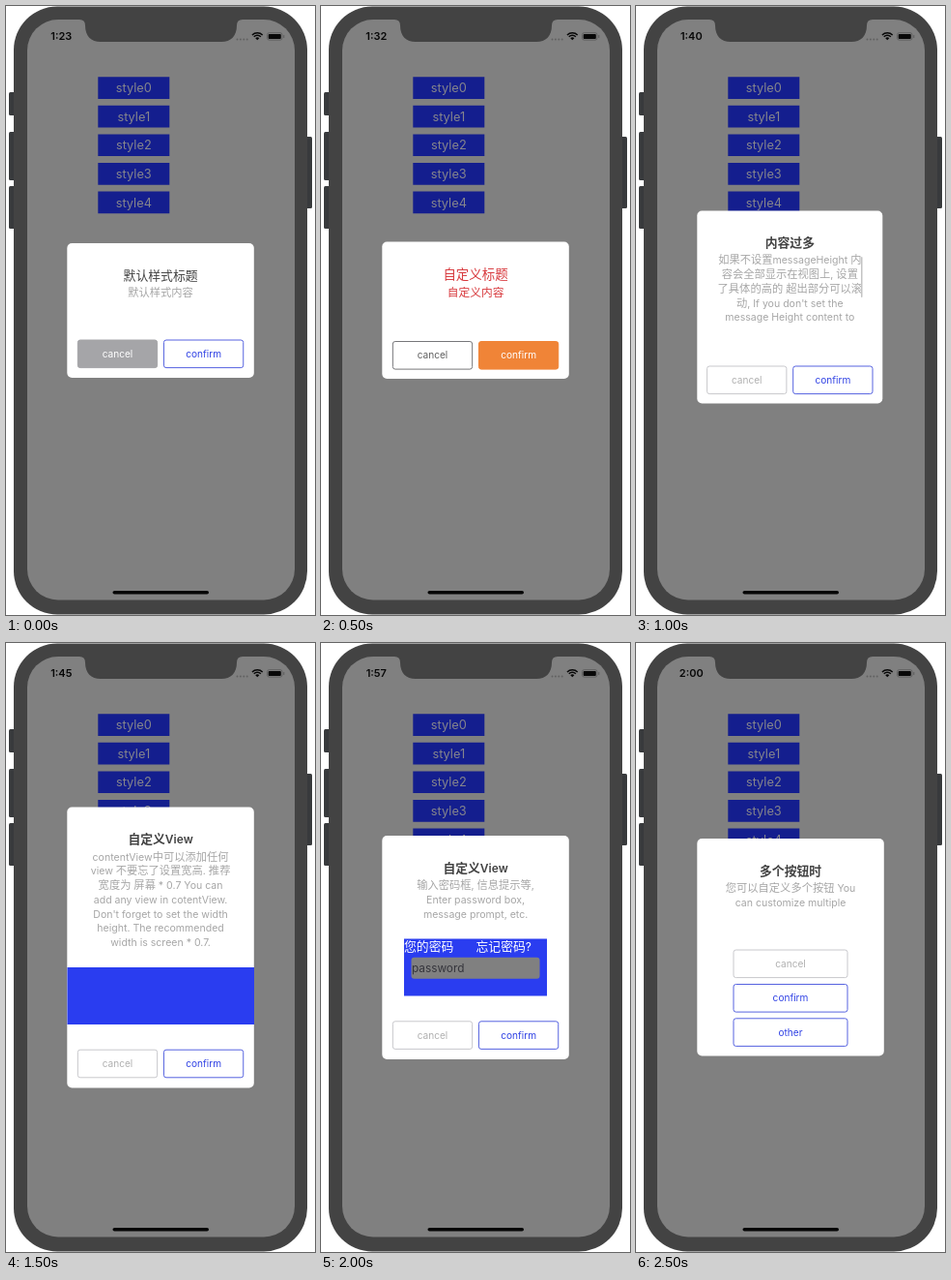
An HTML page with a canvas for the animation above (3 s loop, 320x629 px).

```html
<!DOCTYPE html>
<html lang="zh-CN">
<head>
<meta charset="utf-8">
<style>
html, body { margin: 0; width: 100%; height: 100%; overflow: hidden; background: #fff; }
canvas { display: block; width: 320px; height: 629px; }
</style>
</head>
<body>
<canvas id="stage"></canvas>
<script>
const W = 320, H = 629, HOLD = 500;
const BLUE = '#2a3df0', SCREEN = '#808080', BODY = '#434343';
const canvas = document.getElementById('stage');
const ctx = canvas.getContext('2d');
const dpr = window.devicePixelRatio || 1;
canvas.width = W * dpr;
canvas.height = H * dpr;

function box(x, y, w, h, r, fill, stroke) {
  ctx.beginPath();
  ctx.roundRect(x, y, w, h, r);
  if (fill) { ctx.fillStyle = fill; ctx.fill(); }
  if (stroke) { ctx.strokeStyle = stroke; ctx.lineWidth = 1; ctx.stroke(); }
}

// Chinese runs are set slightly larger than Latin ones.
const isHan = s => /[\u4e00-\u9fff]/.test(s);
function text(str, x, y, size, color, { weight = 400, align = 'center' } = {}) {
  const runs = str.match(/[\u4e00-\u9fff]+|[^\u4e00-\u9fff]+/g);
  const setFont = run => {
    ctx.font = isHan(run)
      ? `${weight} ${size * 1.07}px "Noto Sans CJK SC", "Noto Sans CJK", sans-serif`
      : `${weight} ${size}px Inter, sans-serif`;
  };
  const widths = runs.map(run => { setFont(run); return ctx.measureText(run).width; });
  if (align === 'center') x -= widths.reduce((a, b) => a + b) / 2;
  ctx.fillStyle = color;
  ctx.textAlign = 'left';
  ctx.textBaseline = 'alphabetic';
  runs.forEach((run, i) => {
    setFont(run);
    ctx.fillText(run, x, y + size * 0.36);
    x += widths[i];
  });
}

function button(label, x, y, w, { fill, line, color }) {
  box(x + .5, y + .5, w - 1, 28.6, 2.5, fill || '#fff', line);
  text(label, x + w / 2, y + 14.6, 10.1, color);
}

const GHOST = { line: '#c8c8cc', color: '#b0b0b0' };
const OUTLINE = { line: '#5663e0', color: '#3042e4' };

const scenes = [
  {
    time: '1:23', top: 245, height: 139, title: '默认样式标题', titleWeight: 500,
    lines: ['默认样式内容'], lineY: 296,
    cancel: { fill: '#a5a5a8', line: '#a5a5a8', color: '#fff' }, confirm: OUTLINE, buttonY: 344.5
  },
  {
    time: '1:32', top: 243.5, height: 141.5, title: '自定义标题', titleWeight: 500,
    titleSize: 12.6, titleColor: '#d83a3e',
    lines: ['自定义内容'], lineY: 296.5, lineSize: 11, lineColor: '#d83a3e',
    cancel: { line: '#77777a', color: '#606060' },
    confirm: { fill: '#f08437', line: '#f08437', color: '#fff' }, buttonY: 346
  },
  {
    time: '1:40', top: 211.5, height: 199, width: 192, title: '内容过多',
    lines: ['如果不设置messageHeight 内', '容会全部显示在视图上, 设置', '了具体的高的 超出部分可以滚',
            "动, If you don't set the", 'message Height content to'], lineY: 262.5,
    cancel: GHOST, confirm: OUTLINE, buttonY: 371.5,
    extra() { box(233, 259, 1.5, 42, .7, '#c4c4c4'); }
  },
  {
    time: '1:45', top: 169.5, height: 290, title: '自定义View',
    lines: ['contentView中可以添加任何', 'view 不要忘了设置宽高. 推荐', '宽度为 屏幕 * 0.7 You can',
            'add any view in cotentView.', "Don't forget to set the width", 'height. The recommended',
            'width is screen * 0.7.'], lineY: 220.8,
    cancel: GHOST, confirm: OUTLINE, buttonY: 419.7,
    extra() { box(63.5, 335, 193.5, 59, 0, BLUE); }
  },
  {
    time: '1:57', top: 199, height: 231, title: '自定义View',
    lines: ['输入密码框, 信息提示等,', 'Enter password box,', 'message prompt, etc.'], lineY: 250.3,
    cancel: GHOST, confirm: OUTLINE, buttonY: 390.3,
    extra() {
      box(86, 305.5, 148, 59, 0, BLUE);
      text('您的密码', 86, 313.5, 12, '#fff', { align: 'left' });
      text('忘记密码?', 160.5, 313.5, 12, '#fff', { align: 'left' });
      box(93.5, 324.8, 133, 22, 3, SCREEN);
      text('password', 94, 335.5, 11.8, '#35353c', { align: 'left' });
    }
  },
  {
    time: '2:00', top: 202, height: 224.5, title: '多个按钮时',
    lines: ['您可以自定义多个按钮 You', 'can customize multiple'], lineY: 253.7,
    extra() {
      button('cancel', 100.5, 316.5, 119, GHOST);
      button('confirm', 100.5, 352, 119, OUTLINE);
      button('other', 100.5, 387.3, 119, OUTLINE);
    }
  }
];

function drawNotch() {
  ctx.fillStyle = BODY;
  ctx.beginPath();
  ctx.moveTo(76, 13);
  ctx.lineTo(76, 14);
  ctx.quadraticCurveTo(82, 14, 82, 20);
  ctx.bezierCurveTo(82, 31, 88, 37, 98, 37);
  ctx.lineTo(223, 37);
  ctx.bezierCurveTo(233, 37, 239, 31, 239, 20);
  ctx.quadraticCurveTo(239, 14, 245, 14);
  ctx.lineTo(245, 13);
  ctx.fill();
}

function drawStatus(time) {
  text(time, 57.3, 31.3, 11, '#080808', { weight: 600 });
  for (let i = 0; i < 4; i++) box(238.5 + i * 3.4, 33.4, 2, 2, 1, '#626262');
  ctx.strokeStyle = '#080808';
  ctx.lineWidth = 1.5;
  for (const r of [7.6, 5]) {
    ctx.beginPath();
    ctx.arc(260.3, 35.3, r, -Math.PI * .75, -Math.PI * .25);
    ctx.stroke();
  }
  ctx.fillStyle = '#080808';
  ctx.beginPath();
  ctx.moveTo(260.3, 35.3);
  ctx.arc(260.3, 35.3, 2.9, -Math.PI * .75, -Math.PI * .25);
  ctx.fill();
  box(270.5, 27.7, 15.5, 7.4, 2, null, '#606060');
  box(271.7, 28.9, 13.1, 5, 1, '#080808');
  box(287.2, 30, 1.1, 3, .5, '#606060');
}

function drawPhone(time) {
  ctx.fillStyle = '#fff';
  ctx.fillRect(0, 0, W, H);
  for (const [x, y, h] of [[3, 89, 24], [3, 130, 50], [3, 186, 44], [310, 135, 74]])
    box(x, y, 7, h, 1.5, '#383a3c');
  box(8, .5, 304, 628, 45, BODY);
  box(22, 14, 277, 599.5, 32, SCREEN);
  drawNotch();
  drawStatus(time);
  for (let i = 0; i < 5; i++) {
    const y = 73.3 + i * 29.55;
    box(95.3, y, 74, 22.7, 0, '#141e8e');
    text('style' + i, 132.3, y + 11.4, 12.8, '#85858c');
  }
  box(110.5, 604, 99.5, 3.6, 1.8, '#050505');
}

function drawDialog(s) {
  const width = s.width || 193.5, mid = 63.3 + width / 2;
  box(63.3, s.top, width, s.height, 5, '#fff');
  text(s.title, mid, s.top + 33.6, s.titleSize || 12, s.titleColor || '#424242',
    { weight: s.titleWeight || 600 });
  s.lines.forEach((line, i) =>
    text(line, mid, s.lineY + i * 14.75, s.lineSize || 10.55, s.lineColor || '#a6a6a6'));
  if (s.extra) s.extra();
  if (s.cancel) {
    button('cancel', mid - 86.2, s.buttonY, 83.3, s.cancel);
    button('confirm', mid + 2.9, s.buttonY, 83.3, s.confirm);
  }
}

function frame() {
  const scene = scenes[Math.floor(performance.now() / HOLD) % scenes.length];
  ctx.setTransform(dpr, 0, 0, dpr, 0, 0);
  drawPhone(scene.time);
  drawDialog(scene);
  requestAnimationFrame(frame);
}
frame();
</script>
</body>
</html>
```
